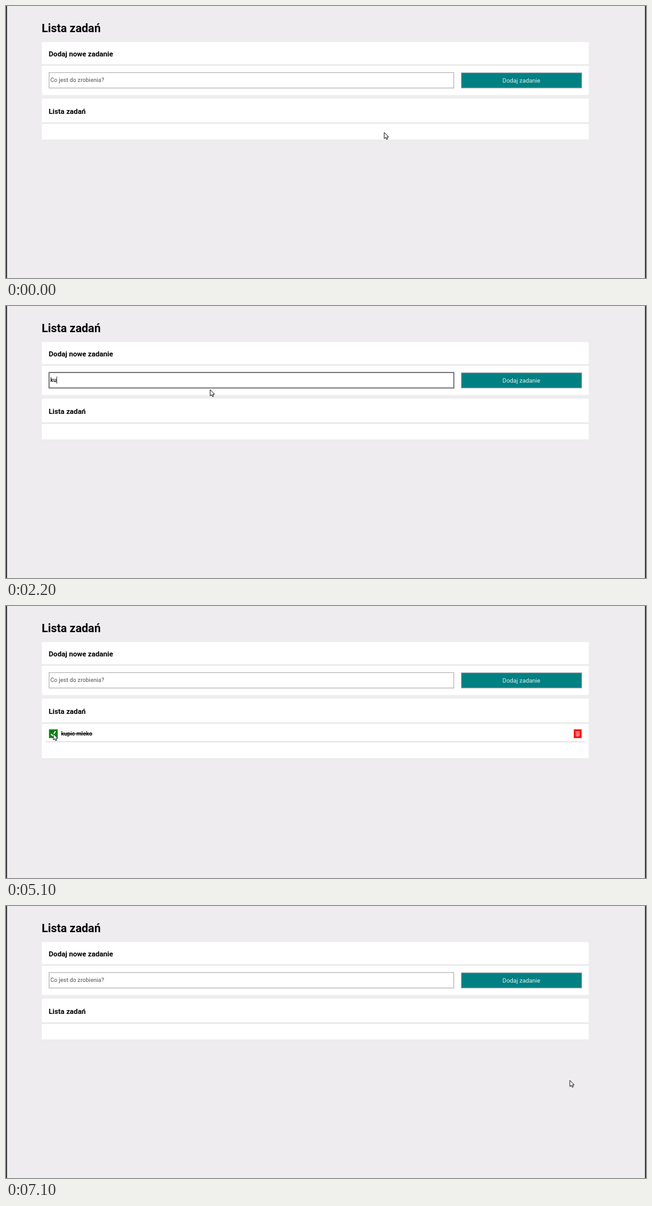
These frames come from a looping animation (1000 px wide and 426 px high, 7200 ms). An HTML page:

```html
<!DOCTYPE html>
<html lang="pl">
<head>
<meta charset="utf-8">
<title>Lista zadań</title>
<style>
  html, body { margin: 0; width: 100%; height: 100%; overflow: hidden; background: #eeecee; }
  svg { display: block; width: 100vw; height: 100vh; }
  text { font-family: Roboto, sans-serif; font-size: 9px; font-weight: 500; white-space: pre; }
  .title { font-size: 17.9px; font-weight: 700; }
  .head { font-size: 11.2px; font-weight: 700; }
  .label { font-size: 9.4px; font-weight: 400; fill: #e4f1f1; }
  .hint { fill: #757575; }
  .card { fill: #fff; }
  .rule { stroke: #d9d9d9; stroke-width: 1.2; }
  .dots { fill: none; stroke: #fff; stroke-opacity: .5; stroke-dasharray: 1 1; }
  #field { fill: #fff; stroke: #a9a9a9; stroke-width: 1; }
  #field.hover { stroke: #858585; }
  #field.focus { stroke: #666469; stroke-width: 1.6; }
</style>
</head>
<body>
<svg viewBox="0 0 1000 426">
  <rect width="1000" height="426" fill="#eeecee"/>
  <rect width="1.5" height="426" fill="#18181c"/>
  <rect x="998.5" width="1.5" height="426" fill="#18181c"/>
  <text class="title" x="55.8" y="40.5">Lista zadań</text>

  <rect class="card" x="56" y="56.5" width="854.5" height="83"/>
  <path class="rule" d="M56 92.3H910.5"/>
  <text class="head" x="66.8" y="78.5">Dodaj nowe zadanie</text>
  <rect id="field" x="67.3" y="104.2" width="632.4" height="24.2"/>
  <text id="hint" class="hint" x="69.2" y="119.2">Co jest do zrobienia?</text>
  <text id="typed" x="69.2" y="119.2"></text>
  <path id="caret" stroke="#333" d="M0 110.5V121.5"/>
  <rect x="711.5" y="104.7" width="188" height="23.6" fill="#008083" stroke="#949fa3"/>
  <text class="label" x="805.3" y="119.7" text-anchor="middle">Dodaj zadanie</text>

  <rect id="list" class="card" x="56" y="145" width="854.5" height="64"/>
  <path class="rule" d="M56 183.3H910.5"/>
  <text class="head" x="66.8" y="169.2">Lista zadań</text>
  <g id="item">
    <rect x="67" y="193" width="14" height="14" fill="#008000"/>
    <rect class="dots" x="67.5" y="193.5" width="13" height="13"/>
    <text x="86" y="203">kupic mleko</text>
    <g id="ticked">
      <path d="M70.3 200.4L72.8 203.2L77.3 196.2" fill="none" stroke="#fff" stroke-width="1.7"/>
      <path d="M86 200.2H134.5" stroke="#000"/>
    </g>
    <rect x="887" y="193" width="12.5" height="14" fill="#f00"/>
    <rect class="dots" x="887.5" y="193.5" width="11.5" height="13"/>
    <path d="M889.8 196.6H896.4M890.8 197V203.7H895.5V197M892.4 197.5V203M894 197.5V203" fill="none" stroke="#ffc4c4" stroke-width=".9"/>
    <path class="rule" d="M61.5 212.6H905"/>
  </g>

  <path id="arrow" d="M0 0V9.8L2.3 7.8L3.8 11L5.4 10.2L4 7.2H6.8Z" fill="#fff" stroke="#222" stroke-linejoin="round"/>
  <path id="beam" d="M-2.5 -4.5H-.7L0 -3.9L.7 -4.5H2.5M-2.5 4.5H-.7L0 3.9L.7 4.5H2.5M0 -4V4" fill="none" stroke="#555"/>
</svg>
<script>
const LOOP = 7200, STEP = 100;
const FOCUS = 1200, TYPE = 2000, TYPED = 3000, ADD = 4200, TICK = 5100, REMOVE = 6100;
const KEY = 90, BLINK = 600;
const task = "kupic mleko";

const $ = id => document.getElementById(id);
const show = (id, on) => $(id).style.display = on ? "" : "none";
const between = (v, a, b) => v >= a && v < b;
const clamp = v => Math.min(1, Math.max(0, v));
const ease = k => k * k * (3 - 2 * k);

// each move: begin, end, x, y, vertical bend on the way
const home = [591, 198];
const moves = [
  [0, 600, 215, 121.5, 0],
  [800, 1200, 318, 118, 0],
  [1900, 2000, 319, 131, 0],
  [3300, 3600, 494, 107, 0],
  [3600, 4100, 742.5, 113, -60],
  [4300, 5000, 74, 200, 70],
  [5200, 5700, 892, 203, 0],
  [6200, 6600, 881, 273, 0]
];

function pointer(t) {
  let [x, y] = home;
  for (const [begin, end, toX, toY, bend] of moves) {
    const k = ease(clamp((t - begin) / (end - begin)));
    x += (toX - x) * k;
    y += (toY - y) * k + bend * Math.sin(Math.PI * k);
  }
  return [x, y];
}

function caretOn(t) {
  if (!between(t, FOCUS, TICK)) return false;
  const last = t >= ADD ? ADD : t >= TYPE ? Math.min(t, TYPED) : FOCUS;
  return (t - last) % (2 * BLINK) < BLINK;
}

function draw(t) {
  const [x, y] = pointer(t);
  const inside = between(x, 67, 700) && between(y, 104, 129);
  const focused = between(t, FOCUS, TICK);
  $("field").setAttribute("class", focused ? "focus" : inside ? "hover" : "");

  const count = between(t, TYPE, ADD) ? Math.floor((t - TYPE) / KEY) : 0;
  $("typed").textContent = task.slice(0, count);
  show("hint", !count);
  show("caret", caretOn(t));
  const end = count ? $("typed").getComputedTextLength() : 0;
  $("caret").setAttribute("transform", `translate(${69.5 + end} 0)`);

  const listed = between(t, ADD, REMOVE);
  show("item", listed);
  show("ticked", t >= TICK);
  $("list").setAttribute("height", listed ? 93.3 : 64);

  show("beam", inside);
  show("arrow", !inside);
  for (const id of ["arrow", "beam"])
    $(id).setAttribute("transform", `translate(${x} ${y})`);
}

const start = performance.now();
function tick() {
  const t = (performance.now() - start) % LOOP;
  draw(Math.floor(t / STEP) * STEP);
  requestAnimationFrame(tick);
}
tick();
</script>
</body>
</html>
```
